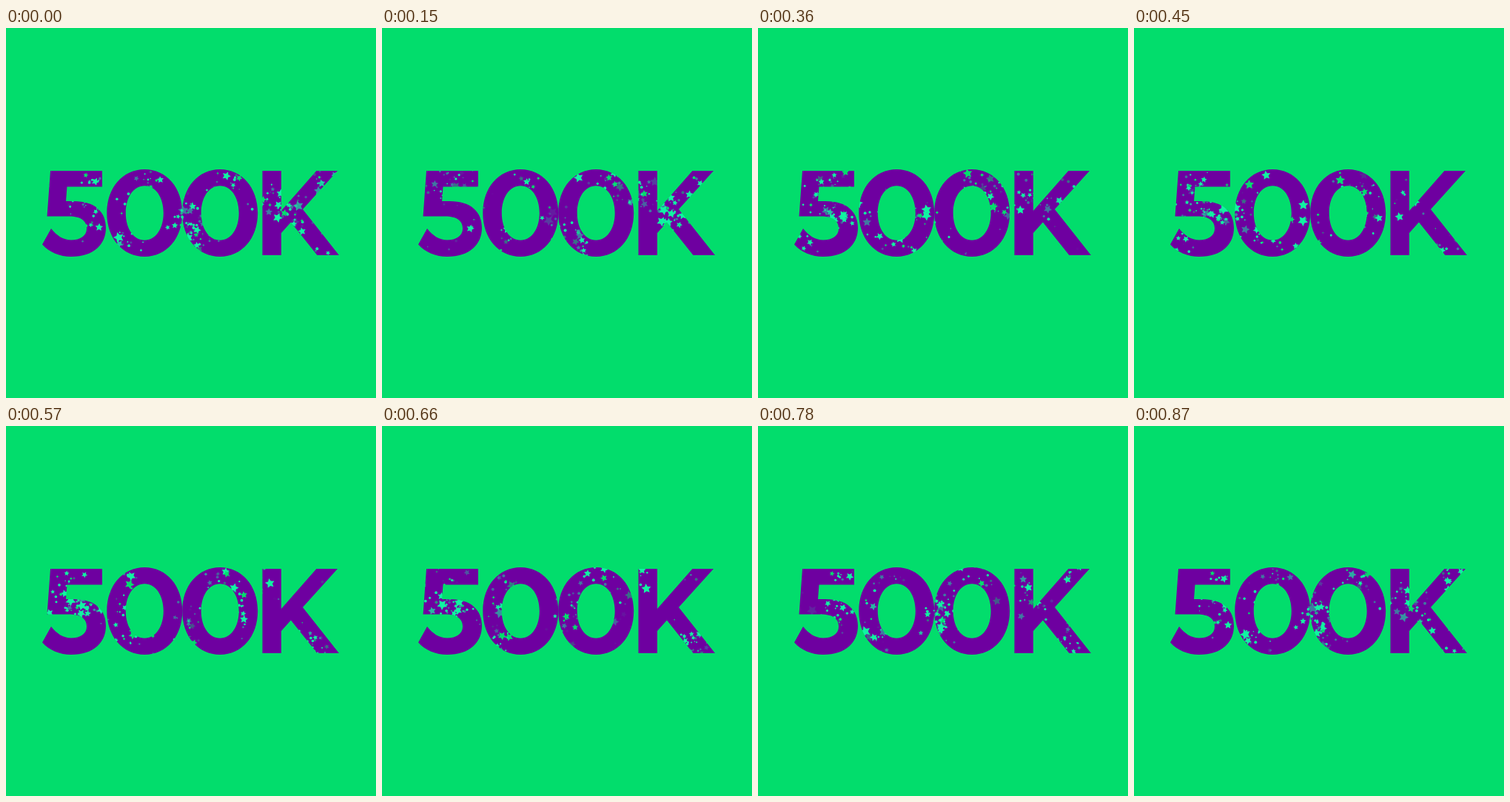
An HTML page with a canvas that plays this animation: 500 by 500 pixels, repeating every 900 ms.

```html
<!DOCTYPE html>
<html lang="en">
<head>
<meta charset="utf-8">
<title>500K</title>
<style>
  html, body { margin: 0; height: 100%; overflow: hidden; background: #02dd6c; }
  canvas { display: block; width: 500px; height: 500px; }
</style>
</head>
<body>
<canvas width="500" height="500" role="img" aria-label="500K"></canvas>
<script>
const ctx = document.querySelector('canvas').getContext('2d');
const LOOP = 900, STEP = 30, TAU = Math.PI * 2;
const PURPLE = '#6e00a0', MINT = '#10f4a2', GREEN = '#02dd6c';

// Lettering
function oval(cx, rx, ry) {
  const cy = 250, k = 0.58, x = rx * k, y = ry * k;
  return `M${cx} ${cy - ry}C${cx + x} ${cy - ry} ${cx + rx} ${cy - y} ${cx + rx} ${cy}` +
    `S${cx + x} ${cy + ry} ${cx} ${cy + ry}S${cx - rx} ${cy + y} ${cx - rx} ${cy}` +
    `S${cx - x} ${cy - ry} ${cx} ${cy - ry}Z`;
}
const zero = cx => oval(cx, 51, 59) + oval(cx, 25.5, 36.7);
const glyphs = [
  'M60 193H130V214.5H82.5L81 234H91C121 234 135 249 135 270C135 292 119 309 88 309' +
  'C73 309 58 303 49 292.5L61 271C68 280 77 286.5 88 286.5C101 286.5 109 280.5 109 271' +
  'C109 261 102 254.5 85 254.5H55.5Z',
  zero(187.3),
  zero(289.2),
  'M346.5 193H372V247L419.5 193H448L401 245L450 307H420.5L385 262.5L372 277V307H346.5Z'
].map(d => new Path2D(d));

// Confetti
let seed = 500;
const rand = (a = 0, b = 1) => {
  seed = (seed * 16807) % 2147483647;
  return a + (b - a) * seed / 2147483647;
};
const spread = s => (rand() + rand() + rand() - 1.5) * s;

function pointOnLettering() {
  let x, y;
  do {
    x = rand(49, 450);
    y = rand(191, 309);
  } while (!glyphs.some(g => ctx.isPointInPath(g, x, y, 'evenodd')));
  return [x, y];
}

function makeParticle(x, y, peak, star) {
  const dir = rand(0, TAU), speed = rand(40, 120);
  return {
    x: x + spread(22), y: y + spread(22), peak, star,
    life: rand(120, 200),
    r: star ? 3 + 4.5 * rand() ** 1.5 : rand(0.6, 2),
    vx: Math.cos(dir) * speed, vy: Math.sin(dir) * speed,
    angle: rand(0, TAU), spin: rand(-4, 4),
    alpha: rand() < 0.25 ? 0.5 : 1,
    color: rand() < 0.2 ? GREEN : MINT
  };
}

// Each burst throws a few stars among many dots
const BURSTS = 60, STARS = 3, PIECES = 11;
const particles = [];
for (let b = 0; b < BURSTS; b++) {
  const [x, y] = pointOnLettering();
  for (let i = 0; i < PIECES; i++) {
    particles.push(makeParticle(x, y, b * LOOP / BURSTS + rand(-60, 60), i < STARS));
  }
}

function drawParticle(p, t) {
  const age = (t - p.peak + LOOP * 1.5) % LOOP - LOOP / 2;
  const left = 1 - Math.abs(age) / p.life;
  if (left <= 0) return;
  const s = age / 1000;
  const x = p.x + p.vx * s, y = p.y + p.vy * s, angle = p.angle + p.spin * s;
  ctx.globalAlpha = p.alpha * Math.min(1, left * 4);
  ctx.fillStyle = p.color;
  ctx.beginPath();
  if (p.star) {
    for (let i = 0; i < 10; i++) {
      const r = i % 2 ? p.r * 0.5 : p.r, a = angle + i * TAU / 10;
      ctx.lineTo(x + r * Math.cos(a), y + r * Math.sin(a));
    }
  } else {
    ctx.arc(x, y, p.r, 0, TAU);
  }
  ctx.fill();
}

function draw(now) {
  const t = Math.floor(now % LOOP / STEP) * STEP;
  ctx.globalAlpha = 1;
  ctx.globalCompositeOperation = 'source-over';
  ctx.clearRect(0, 0, 500, 500);
  ctx.fillStyle = PURPLE;
  glyphs.forEach(g => ctx.fill(g, 'evenodd'));
  ctx.globalCompositeOperation = 'source-atop';
  particles.forEach(p => drawParticle(p, t));
  requestAnimationFrame(draw);
}
requestAnimationFrame(draw);
</script>
</body>
</html>
```
